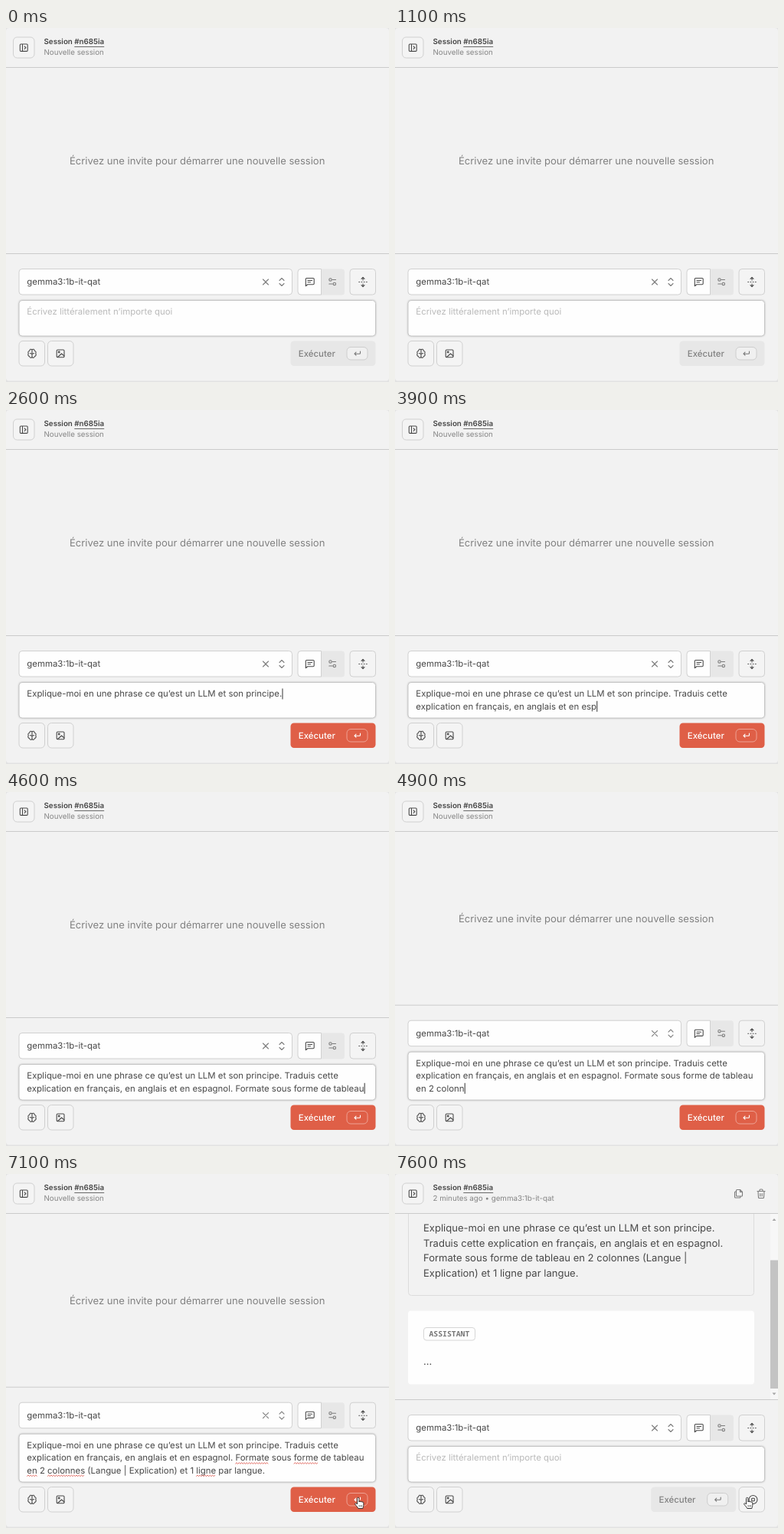
Animation of 500 by 462 pixels, one loop 8000 ms. Source, as an HTML page:

```html
<!DOCTYPE html>
<html lang="fr">
<head>
<meta charset="utf-8">
<title>Nouvelle session</title>
<style>
  html, body { margin: 0; width: 100%; height: 100%; overflow: hidden; background: #e2e2e2; }
  svg { display: block; width: 500px; height: 462px; }
  text { font-family: Inter, sans-serif; font-size: 11.41px; fill: #484848; text-rendering: geometricPrecision; }
  .small { font-size: 9.78px; fill: #858585; }
  .title { font-size: 9.78px; font-weight: 600; fill: #454545; }
  .large { font-size: 13.04px; }
  .muted { fill: #818181; }
  .hint { fill: #bababa; }
  .box { fill: #f4f4f4; stroke: #d0d0d0; }
  .white { fill: #fefefe; }
  .rule { stroke: #cbcbcb; }
  .icon { fill: none; stroke: #4a4a4a; stroke-width: 1.1; stroke-linecap: round; stroke-linejoin: round; }
  .soft { stroke: #7c7c7c; }
  #run .face { fill: #e7e7e7; }
  #run text { fill: #808080; font-weight: 500; }
  #run .key { fill: #f0f0f0; stroke: #cdcdcd; }
  #run .icon { stroke: #777; }
  #run.on .face { fill: #df5f47; }
  #run.on text { fill: #fff; }
  #run.on .key { fill: none; stroke: #eea294; }
  #run.on .icon { stroke: #fff; }
  #marks { fill: none; stroke: #df5a50; stroke-width: .9; }
  #field { filter: drop-shadow(0 .5px 1px #0003); }
</style>
</head>
<body>
<svg viewBox="0 0 500 462">
  <rect width="500" height="460.5" rx="4" fill="#f2f2f2"/>

  <g id="chat">
    <path d="M17.500 52V154.500a4 4 0 0 0 4 4H464.500a4 4 0 0 0 4-4V52" fill="none" stroke="#dcdcdc"/>
    <g class="message">
      <text class="large" x="37" y="75.400">Explique-moi en une phrase ce qu’est un LLM et son principe.</text>
      <text class="large" x="37" y="94.900">Traduis cette explication en français, en anglais et en espagnol.</text>
      <text class="large" x="37" y="114.400">Formate sous forme de tableau en 2 colonnes (Langue |</text>
      <text class="large" x="37" y="133.900">Explication) et 1 ligne par langue.</text>
    </g>
    <rect class="white" x="17" y="178.500" width="452" height="96" rx="4"/>
    <rect x="37.500" y="200.500" width="67" height="16.500" rx="3.500" fill="#fefefe" stroke="#d6d6d6"/>
    <text x="44.500" y="212.200" style="font:600 9.78px 'Noto Sans Mono', monospace;fill:#757575">ASSISTANT</text>
    <text class="large" x="37" y="249">...</text>
    <rect x="490" y="52" width="10" height="242" fill="#f7f7f7"/>
    <rect x="490" y="112.500" width="10" height="167.500" fill="#c3c3c3"/>
    <path d="M492.500 61l2.500-3 2.500 3zM492.500 285.500l2.500 3 2.500-3z" fill="#a6a6a6"/>
    <g class="icon soft">
      <path d="M446.500 20.500h4l3 3v4.500a1 1 0 0 1-1 1h-6a1 1 0 0 1-1-1v-6.500a1 1 0 0 1 1-1zM450.500 20.500v3h3M445.500 23h-1a1 1 0 0 0-1 1v6a1 1 0 0 0 1 1h5.500a1 1 0 0 0 1-1v-1"/>
      <path d="M473 22.500h10M474 22.500l.500 8a1 1 0 0 0 1 1h5a1 1 0 0 0 1-1l.500-8M476 22.500v-1.500a1 1 0 0 1 1-1h2a1 1 0 0 1 1 1v1.500M476.800 25.500v3.500M479.200 25.500v3.500"/>
    </g>
  </g>

  <path class="rule" d="M0 51.500H500"/>
  <rect class="box" x="9.500" y="12" width="27.500" height="27" rx="5"/>
  <path class="icon" d="M19.500 21h7.500a1.200 1.200 0 0 1 1.200 1.200v7a1.200 1.200 0 0 1-1.200 1.200h-7.500a1.200 1.200 0 0 1-1.200-1.200v-7a1.200 1.200 0 0 1 1.200-1.200zM21.500 21v9.400M24.200 24l1.700 1.700-1.700 1.700"/>
  <text class="title" x="49.500" y="20.500">Session <tspan id="tag">#n685ia</tspan></text>
  <path id="link" stroke="#6a6a6a" fill="none"/>
  <text id="sub" class="small" x="49.500" y="35"></text>

  <text id="empty" class="large muted" x="249.700" text-anchor="middle">Écrivez une invite pour démarrer une nouvelle session</text>

  <g id="dock">
    <path class="rule" d="M0 294.500H500"/>
    <rect class="box white" x="17" y="314.500" width="356.500" height="33.500" rx="4"/>
    <text x="27.300" y="335.300">gemma3:1b-it-qat</text>
    <path class="icon soft" d="M335.500 328l7 7M342.500 328l-7 7M357 329.500l3-3 3 3M357 333.500l3 3 3-3"/>
    <rect x="381" y="314.500" width="61" height="34" rx="4" fill="#e7e7e7"/>
    <path class="box white" d="M411.500 314.500H385a4 4 0 0 0-4 4V344a4 4 0 0 0 4 4H411.500z"/>
    <path class="icon" d="M392.500 326.500h8.500a1.200 1.200 0 0 1 1.200 1.200v5.800a1.200 1.200 0 0 1-1.200 1.200h-7.200l-2.500 2v-9a1.200 1.200 0 0 1 1.200-1.200zM394 329.500h5.500M394 331.800h3.500"/>
    <g class="icon soft">
      <circle cx="423.500" cy="328.500" r="1.700"/>
      <circle cx="428.800" cy="334" r="1.700"/>
      <path d="M426 328.500h4.500M421.800 334h4.500"/>
    </g>
    <rect class="box" x="449" y="314.500" width="33.500" height="33.500" rx="4"/>
    <path class="icon" d="M466 329v-3.500M464 327.300l2-2 2 2M466 334v3.500M464 335.700l2 2 2-2M460.800 331.500h.8M464 331.500h.8M467.200 331.500h.8M470.400 331.500h.8"/>
  </g>

  <rect id="field" class="white" x="17" width="465.500" rx="4" stroke="#c4c4c4"/>
  <g id="prompt">
    <text id="hint" class="hint" x="27.300" y="374.400">Écrivez littéralement n’importe quoi</text>
    <g id="lines"></g>
    <path id="marks"/>
    <rect id="caret" width="1" height="14" fill="#333"/>
  </g>

  <rect class="box" x="17" y="408.500" width="33.500" height="32.500" rx="5"/>
  <path class="icon" d="M34 420c-1-1.500-3.400-.7-3.200 1.200-2 .4-2.300 2.300-1.500 3.600-1 1.300-.5 3.400 1.300 3.700.2 2 2.600 2.600 3.400.8zM34 420c1-1.500 3.400-.7 3.200 1.200 2 .4 2.300 2.300 1.500 3.600 1 1.300.5 3.400-1.300 3.700-.2 2-2.600 2.600-3.400.8zM31.500 424.500l2.500 1M36.500 424.500l-2.500 1"/>
  <rect class="box" x="54.500" y="408.500" width="33.500" height="32.500" rx="5"/>
  <g class="icon">
    <rect x="66.200" y="420" width="9.800" height="9.800" rx="1.300"/>
    <circle cx="69.200" cy="423" r=".9"/>
    <path d="M67.500 429.500l5-4.500 3.500 3"/>
  </g>

  <g id="stop">
    <rect class="box" x="449" y="408.500" width="33.500" height="32.500" rx="5"/>
    <circle class="icon" cx="467.500" cy="425" r="5.500"/>
    <rect class="icon" x="465.700" y="423.200" width="3.600" height="3.600" rx=".6"/>
  </g>
  <g id="run">
    <rect class="face" x="371.500" y="408.500" width="111" height="32.500" rx="4.500"/>
    <text x="381.800" y="429">Exécuter</text>
    <rect class="key" x="445" y="416.500" width="27" height="16.500" rx="5"/>
    <path class="icon" d="M462.500 422v2.200a1 1 0 0 1-1 1h-6.500M457 423.200l-2 2 2 2"/>
  </g>

  <g id="arrow" stroke="#111" stroke-width=".9" fill="#fff">
    <path d="M0 0V13L3 10.300 5 15 7 14.100 5 9.500H9z"/>
  </g>
  <g id="hand" stroke="#222" stroke-width=".9" stroke-linejoin="round" fill="#fff">
    <path d="M-1 1a1.200 1.200 0 0 1 2.400 0V5.500c.2-1.200 2-1.100 2.100.1.400-1 1.900-.8 2 .4.500-.8 1.800-.4 1.800.7V10c0 1.700-.8 2.300-1 4H.300C0 12.500-2.500 10.500-3.700 8.500c-.7-1.100.8-2 1.700-1L-1 8.500z"/>
    <path d="M1.500 9.500v2.500M3.300 9.500v2.500M5 9.500v2.500" stroke-width=".6"/>
  </g>
</svg>

<script>
const LOOP = 8000, LEFT = 27.3, STEP = 16.3;
const $ = id => document.getElementById(id);
const set = (el, attrs) => { for (const k in attrs) el.setAttribute(k, attrs[k]); };
const show = (el, on) => { el.style.display = on ? "" : "none"; };
const move = (el, x, y) => el.setAttribute("transform", `translate(${x} ${y})`);
const svgNode = (name, parent) =>
  parent.appendChild(document.createElementNS("http://www.w3.org/2000/svg", name));

const lines = [
  "Explique-moi en une phrase ce qu’est un LLM et son principe. Traduis cette",
  "explication en français, en anglais et en espagnol. Formate sous forme de tableau",
  "en 2 colonnes (Langue | Explication) et 1 ligne par langue."
];
const CHUNK = 12;
// Each entry types one more chunk; equal times land together.
const typing = [1500, 1700, 2000, 2200, 2500, 2800, 2900, 3300, 3300,
  3900, 4000, 4300, 4600, 4900, 5100, 5200, 5400, 5800];
const misspelt = [[1, "Formate"], [1, "forme"], [2, "en"], [2, "colonnes"], [2, "ligne"]];
const path = [[6800, 455, 311], [6900, 466, 392], [7000, 462, 438], [7100, 459.5, 422.5]];
const BLUR = 6800, SENT = 7500;

const rows = lines.map((line, i) => {
  const el = svgNode("text", $("lines"));
  set(el, { x: LEFT, y: 374.4 + i * STEP });
  el.textContent = line;
  return el;
});

function squiggle([row, word]) {
  const at = lines[row].indexOf(word);
  const x = LEFT + (at ? rows[row].getSubStringLength(0, at) : 0);
  const width = rows[row].getSubStringLength(at, word.length);
  let d = `M${x} ${378.3 + row * STEP}`;
  for (let i = 0; i < Math.floor(width / 1.65); i++) d += `l1.65 ${i % 2 ? 1.6 : -1.6}`;
  return d;
}
$("marks").setAttribute("d", misspelt.map(squiggle).join(""));

const tagX = $("tag").getStartPositionOfChar(0).x;
$("link").setAttribute("d", `M${tagX} 24.5h${$("tag").getComputedTextLength()}`);

let typed = -1;
function type(count) {
  if (count === typed) return;
  typed = count;
  let start = 0, x = LEFT, row = 0;
  rows.forEach((el, i) => {
    el.textContent = lines[i].slice(0, Math.max(0, count - start));
    if (count > start) {
      row = i;
      x = LEFT + el.getComputedTextLength();
    }
    start += lines[i].length + 1;
  });
  set($("caret"), { x: x + 0.2, y: 363.5 + row * STEP });
}

function pointer(t) {
  const i = path.findIndex(p => p[0] > t);
  if (i < 0) return path[path.length - 1].slice(1);
  const [a, b] = [path[i - 1], path[i]];
  const k = (t - a[0]) / (b[0] - a[0]);
  return [a[1] + (b[1] - a[1]) * k, a[2] + (b[2] - a[2]) * k];
}

function draw(t) {
  const sent = t >= SENT;
  const count = sent ? 0 : typing.filter(at => at <= t).length * CHUNK;
  const lift = count > lines[0].length + lines[1].length + 2 ? STEP : 0;

  type(count);
  move($("dock"), 0, -lift);
  move($("prompt"), 0, -lift);
  set($("field"), { y: 355.5 - lift, height: 46.5 + lift });
  $("empty").setAttribute("y", 178.3 - lift / 2);
  show($("hint"), count === 0);
  show($("caret"), (t >= 300 && t < 800) || (t >= 1300 && t < BLUR));
  show($("marks"), t >= BLUR && !sent);

  show($("chat"), sent);
  show($("empty"), !sent);
  show($("stop"), sent);
  $("sub").textContent = sent ? "2 minutes ago • gemma3:1b-it-qat" : "Nouvelle session";
  $("run").classList.toggle("on", count > 0);
  move($("run"), sent ? -37.3 : 0, 0);

  const moving = t >= path[0][0];
  const [x, y] = moving ? pointer(t) : [0, 0];
  const over = y > 408;
  show($("arrow"), moving && !over);
  show($("hand"), moving && over);
  move($(over ? "hand" : "arrow"), x, y);
}

const begin = performance.now();
function tick() {
  draw((performance.now() - begin) % LOOP);
  requestAnimationFrame(tick);
}
tick();
</script>
</body>
</html>
```
